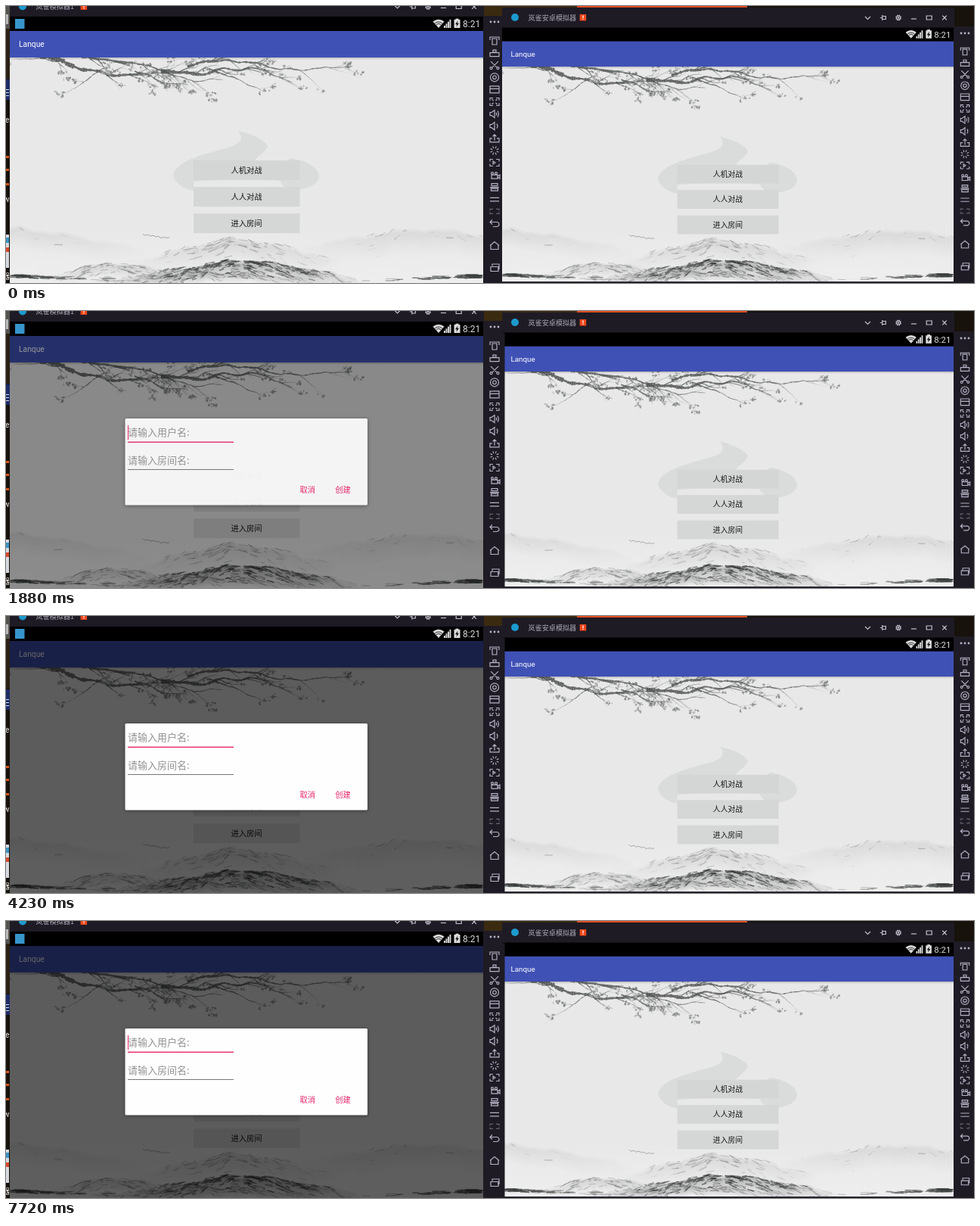
Recreate the animation shown at these times as an HTML page with a canvas. Size 1280x366 px, loop 8000 ms.

```html
<!DOCTYPE html>
<html lang="zh-CN">
<head>
<meta charset="utf-8">
<style>
html, body { margin: 0; width: 100%; height: 100%; overflow: hidden; background: #1d1b24; }
canvas { display: block; width: 1280px; height: 366px; }
</style>
</head>
<body>
<canvas id="stage" width="1280" height="366"></canvas>
<script>
const g = document.getElementById('stage').getContext('2d');
const LOOP = 8000;
const CJK = '"Noto Sans CJK SC", "Noto Sans CJK", sans-serif';
const LATIN = 'Roboto, "Noto Sans", sans-serif';
const CHROME = '#1e1b25', ICON = '#b4b2c3', PINK = '#e5286b';

let seed = 1;
function rnd() {
  seed = (seed * 16807) % 2147483647;
  return seed / 2147483647;
}
const spread = r => (rnd() + rnd() - 1) * r;
const ink = (tone, alpha) => `rgba(${tone},${tone + 3},${tone + 2},${alpha})`;

function rect(x, y, w, h, color) {
  g.fillStyle = color;
  g.fillRect(x, y, w, h);
}
function text(str, x, y, size, color, font = CJK, align = 'left') {
  g.font = `${size}px ${font}`;
  g.textAlign = align;
  g.fillStyle = color;
  g.fillText(str, x, y + size * 0.37);
}
function disc(x, y, r, color) {
  g.fillStyle = color;
  g.beginPath();
  g.arc(x, y, r, 0, Math.PI * 2);
  g.fill();
}
function line(x0, y0, x1, y1, color, width) {
  g.strokeStyle = color;
  g.lineWidth = width;
  g.beginPath();
  g.moveTo(x0, y0);
  g.lineTo(x1, y1);
  g.stroke();
}
function icon(d, x, y, color, width = 1.2, scale = 1) {
  g.save();
  g.translate(x, y);
  g.scale(scale, scale);
  g.strokeStyle = color;
  g.lineWidth = width;
  g.stroke(new Path2D(d));
  g.restore();
}
function fade(y0, y1, from, to) {
  const ramp = g.createLinearGradient(0, y0, 0, y1);
  ramp.addColorStop(0, from);
  ramp.addColorStop(1, to);
  return ramp;
}

// Icon parts, centred on the origin
const box = (w, h, y = 0) => `M${-w / 2} ${y - h / 2}h${w}v${h}h${-w}z`;
const bar = (w, y = 0) => `M${-w / 2} ${y}h${w}`;
const ring = (r, x = 0, y = 0) => `M${x + r} ${y}a${r} ${r} 0 1 1 ${-2 * r} 0a${r} ${r} 0 1 1 ${2 * r} 0`;
const wave = r => `M${r} ${-r}q${r * 0.7} ${r} 0 ${2 * r}`;
const rays = (n, from, to) => Array.from({ length: n }, (_, i) => {
  const a = (i + 0.5) * Math.PI * 2 / n;
  return `M${Math.cos(a) * from} ${Math.sin(a) * from}L${Math.cos(a) * to} ${Math.sin(a) * to}`;
}).join('');
const corners = (w, h) => [-1, 1].flatMap(sx => [-1, 1].map(sy =>
  `M${sx * w} ${sy * h / 3}V${sy * h}H${sx * w / 3}`)).join('');
const speaker = 'M-6-2h2l4-3v10l-4-3h-2z';

const WINDOW_ICONS = [
  'M-3.5-1.5L0 2l3.5-3.5',
  'M-4 0h3' + 'M-1-3.5v7M-1-2h4.5v4h-4.5',
  ring(2.6) + ring(0.6) + rays(8, 2.8, 4),
  bar(7, 1.5),
  box(7, 5),
  rays(4, 0, 4)
];
const TOOLS = [
  box(6, 8, 1) + 'M-6-1v-4h12v4',
  box(12, 5, 2) + box(4, 3, -2.5),
  'M-5-5l8 8M5-5l-8 8' + ring(1.5, -4.5, 4) + ring(1.5, 4.5, 4),
  ring(5.5) + ring(2.3),
  box(12, 9) + bar(12, -1),
  corners(6, 5) + rays(4, 2, 5),
  speaker + wave(2) + wave(4),
  speaker + wave(3),
  'M-3 0h-3v5h12v-5h-3M0 3v-8M-2.5-2.5L0-5l2.5 2.5',
  rays(8, 3, 6),
  corners(6, 4.5) + 'M-2-2l3 2-3 2z',
  box(8, 5, 2.5) + ring(1.5, -3, -2) + ring(1.5, 2, -2) + 'M4 2l3-2v5l-3-2',
  box(8, 3, -3) + bar(12, 0.5) + box(9, 3, 3.5),
  bar(12, -2) + bar(12, 2.5),
  corners(6, 3),
  'M-3-5l-3 3 3 3M-6-2h9a3 3 0 0 1 0 6h-5',
  'M-6 0l6-5 6 5M-5-1v6h10v-6',
  box(10, 6, 2) + 'M-3-2v-2.5h9v6.5h-2'
];

function blossoms(x, y, size) {
  for (let i = 0; i < size; i++) {
    g.fillStyle = ink(100 + rnd() * 90 | 0, 0.7);
    g.beginPath();
    g.ellipse(x + spread(size * 1.3), y + spread(4), 0.8 + rnd() * 1.7, 0.6 + rnd(), rnd() * 3, 0, 7);
    g.fill();
  }
}

// A tapering, knotted limb that sprouts side twigs until they get thin
function limb(x, y, angle, length, width) {
  const home = angle, start = width;
  for (let run = 0; run < length; run += 3) {
    angle += (home - angle) * 0.15 + spread(0.35);
    const nx = x + Math.cos(angle) * 3, ny = y + Math.sin(angle) * 3;
    width = start * (1 - 0.8 * run / length);
    line(x, y, nx, ny, ink(65 + 60 / (width + 0.6) | 0, 0.85), width * (0.6 + rnd() * 0.8));
    x = nx;
    y = ny;
    if (start > 0.9 && rnd() < 0.17) {
      limb(x, y, home + (rnd() < 0.55 ? 0.5 : -0.4) + spread(0.3), 10 + rnd() * length * 0.15, Math.min(width * 0.6, 1.4));
    }
  }
  if (rnd() < 0.6) blossoms(x, y, 4 + rnd() * 4);
}

// A misty ridge, fading sideways and downwards, with brushed slopes
function ridge(cx, top, half, rise, depth, alpha, marks) {
  const crest = x => top + rise * Math.abs((x - cx) / half) ** 1.3 +
    Math.sin(x * 0.09 + cx) * 1.6 + Math.sin(x * 0.23) * 0.8;
  const weight = x => alpha * (1 - ((x - cx) / half) ** 2);
  for (let x = cx - half; x < cx + half; x += 2) {
    const y = crest(x);
    const ramp = fade(y, y + depth, ink(110, 0), ink(110, 0));
    ramp.addColorStop(0.2, ink(110, weight(x) * 0.5));
    rect(x, y, 2, depth, ramp);
  }
  for (let i = 0; i < marks; i++) {
    const x = cx + spread(half), drop = rnd() * rnd() * depth, len = 3 + rnd() * 9;
    const slope = Math.sign(x - cx) * len;
    line(x, crest(x) + drop, x + slope, crest(x + slope) + drop + rnd() * 3,
      ink(50, weight(x) * (0.3 + rnd() * 0.7)), 0.5 + rnd() * 1.2);
  }
}

function shore() {
  for (let i = 0; i < 150; i++) {
    const reach = rnd() * rnd() * 190, len = 4 + rnd() * 14;
    const x = i % 2 ? 5 + reach : 631 - reach - len;
    const y = 355 + reach * 0.035 + rnd() * 4;
    line(x, y, x + len, y + spread(1), ink(60, 0.7 - reach / 320), 0.6 + rnd() * 1.2);
  }
}

function painting() {
  seed = 77;
  rect(5, 68, 626, 298, '#e8e8e8');
  rect(5, 290, 626, 76, fade(290, 366, 'rgba(238,238,238,0)', '#eee'));

  limb(45, 68, 0.12, 175, 5.5);
  limb(100, 68, 0.08, 190, 3);
  limb(205, 86, 0.03, 180, 4);
  limb(240, 80, -0.04, 215, 3);
  limb(170, 86, 0.24, 75, 2);
  limb(268, 83, 0.25, 80, 2);
  limb(75, 72, 3.1, 62, 1.6);
  limb(130, 82, 2.9, 65, 1.4);

  ridge(10, 291, 180, 30, 30, 0.22, 12);
  ridge(555, 292, 170, 24, 34, 0.24, 25);
  ridge(305, 306, 140, 30, 32, 0.3, 130);
  ridge(145, 338, 90, 18, 20, 0.4, 90);
  ridge(312, 335, 165, 26, 25, 0.85, 300);
  ridge(265, 350, 160, 12, 14, 0.5, 110);
  shore();
  for (let i = 0; i < 5; i++) icon('M-3-1q2 0 3 2q1-2 4-1', 184 + i * 7, 304 + spread(4), '#888', 0.7);
}

function swirl() {
  g.fillStyle = '#dadcdc';
  g.fill(new Path2D(`M307 165C326 169 343 178 346 185C343 193 333 198 328 205
    C345 209 369 211 376 201C398 204 414 214 414 226C412 237 397 243 378 243
    C369 241 365 236 362 231C330 229 280 229 248 232V244
    C231 241 222 231 221 223C225 207 251 199 272 193C301 185 319 182 307 165Z`));
}

function statusBar() {
  const tint = '#dcdcdc';
  rect(5, 14, 626, 19, '#000');
  g.fillStyle = tint;
  g.fill(new Path2D('M564.5 20.5Q572 15 579.5 20.5L572 29Z'));
  g.strokeStyle = '#000';
  g.lineWidth = 0.8;
  for (const r of [4.5, 7]) {
    g.beginPath();
    g.arc(572, 28, r, Math.PI * 1.2, Math.PI * 1.8);
    g.stroke();
  }
  for (let i = 0; i < 4; i++) rect(579 + i * 2.5, 26 - i * 2.7, 1.9, 3 + i * 2.7, tint);
  rect(592.5, 18, 8, 11, tint);
  rect(594.5, 16.7, 4, 2, tint);
  g.fillStyle = '#111';
  g.fill(new Path2D('M597.5 19.5l-3.5 4.7h2.2l-.8 3.5 3.6-4.9h-2.2z'));
  text('8:21', 604, 23.6, 12, tint, LATIN);
}

function screen(pressed) {
  statusBar();
  g.save();
  g.beginPath();
  g.rect(5, 33, 626, 333);
  g.clip();
  painting();
  swirl();
  ['人机对战', '人人对战', '进入房间'].forEach((label, i) => {
    const y = 204 + i * 35.1;
    rect(248, y, 140.5, 26, pressed && i === 1 ? '#c6c8c8' : 'rgba(212,214,214,0.93)');
    text(label, 318, y + 13, 10.3, '#151515', CJK, 'center');
  });
  rect(5, 33, 626, 35, '#3f51b5');
  rect(5, 68, 626, 3, fade(68, 71, 'rgba(0,0,0,0.2)', 'rgba(0,0,0,0)'));
  text('Lanque', 17, 50.6, 10.3, '#fff', LATIN);
  g.restore();
}

function dialog(opacity, cursor) {
  g.save();
  g.globalAlpha = opacity;
  g.shadowColor = 'rgba(0,0,0,0.4)';
  g.shadowBlur = 5;
  g.shadowOffsetY = 1;
  g.fillStyle = '#fefefe';
  g.beginPath();
  g.roundRect(157.5, 142, 320.5, 114.5, 1.5);
  g.fill();
  g.restore();
  text('请输入用户名:', 161, 160.3, 13, '#929292');
  text('请输入房间名:', 161, 197, 13, '#929292');
  rect(161, 172.6, 140, 1.4, PINK);
  rect(161, 209, 140, 1, '#777');
  text('取消', 388.5, 236.3, 10.3, PINK);
  text('创建', 435.3, 236.3, 10.3, PINK);
  if (cursor) rect(161, 151, 1, 19, PINK);
}

function titleBar(x, y, title, iconsX) {
  const size = 9.1, badge = x + 22 + title.length * size;
  disc(x, y, 5, '#1c9ace');
  text(title, x + 17.5, y + 0.3, size, '#aaa8b5');
  rect(badge, y - 4, 8.5, 8.5, '#f0481d');
  rect(badge + 3.7, y - 2.5, 1.3, 3.4, '#fff');
  rect(badge + 3.7, y + 1.8, 1.3, 1.2, '#fff');
  WINDOW_ICONS.forEach((d, i) => icon(d, iconsX + i * 20.3, y + 0.5, '#c4c2cf'));
}

// Tools are evenly spaced; the last two keys stand further apart
function toolbar(x, dotsY, first, step, scale) {
  for (const dx of [-5, 0, 5]) disc(x + dx, dotsY, 1.4, ICON);
  TOOLS.forEach((d, i) => {
    const y = first + Math.min(i, 15) * step + Math.max(i - 15, 0) * 29;
    icon(d, x, y, i === 14 ? '#64616f' : ICON, 1.2, scale);
  });
}

function desktop() {
  rect(0, 0, 1280, 366, '#17120b');
  rect(632, 0, 123, 13, '#3a2a10');
  rect(755, 0, 225, 2, '#e04c20');
  rect(0, 0, 5, 30, '#55534f');
  rect(0, 11, 3, 13, '#b9b9b9');
  rect(0, 30, 5, 66, '#2b2112');
  rect(0, 97, 5, 27, '#1d2c66');
  for (let y = 110; y < 120; y += 4) rect(0, y, 4, 1, '#dfe3f2');
  for (const y of [198, 215, 234]) rect(0, y, 4, 3, '#d8561b');
  rect(0, 302, 4, 44, '#d5d9df');
  rect(0, 306, 4, 7, '#3c94c4');
  rect(0, 319, 4, 6, '#d54b2c');
  text('e', -1, 150, 10, '#eee', LATIN);
  text('w', -3, 255, 10, '#eee', LATIN);
  text('器', -5, 357, 10, '#eee');
}

function draw({ pressed, inset, dim, opacity, cursor }) {
  desktop();
  rect(5, 0, 627, 366, CHROME);
  rect(632, 13, 24, 353, CHROME);
  titleBar(22, 0.5, '岚雀模拟器1', 517.5);
  screen(pressed);
  rect(12, 17, 12.5, 13, '#3795cc');
  toolbar(646, 21, 46, 16.1, 1);
  if (dim) {
    rect(5, 33, 626, 333, `rgba(0,0,0,${dim})`);
    dialog(opacity, cursor);
  }

  rect(656, 2, 598, 364, CHROME);
  rect(1254, 27, 26, 339, CHROME);
  titleBar(673, 15, '岚雀安卓模拟器', 1139.5);
  g.save();
  g.translate(656, 80);
  g.scale(597 / 626, 597 / 626);
  g.translate(-5, -68);
  screen(false);
  g.restore();
  if (inset) rect(656, 29, 3.5, 337, CHROME);
  toolbar(1268, 36, 60, 15.07, 0.95);
}

function stateAt(t) {
  return {
    pressed: t >= 1480 && t < 1730,
    inset: t >= 1480,
    dim: t < 1880 ? 0 : t < 2000 ? 0.41 : 0.6,
    opacity: t < 2000 ? 0.94 : 1,
    cursor: t < 2235 || Math.floor((t - 2235) / 498) % 2 === 1
  };
}

let shown = '';
function tick() {
  const state = stateAt(performance.now() % LOOP);
  const key = JSON.stringify(state);
  if (key !== shown) {
    draw(state);
    shown = key;
  }
  requestAnimationFrame(tick);
}
tick();
</script>
</body>
</html>
```
